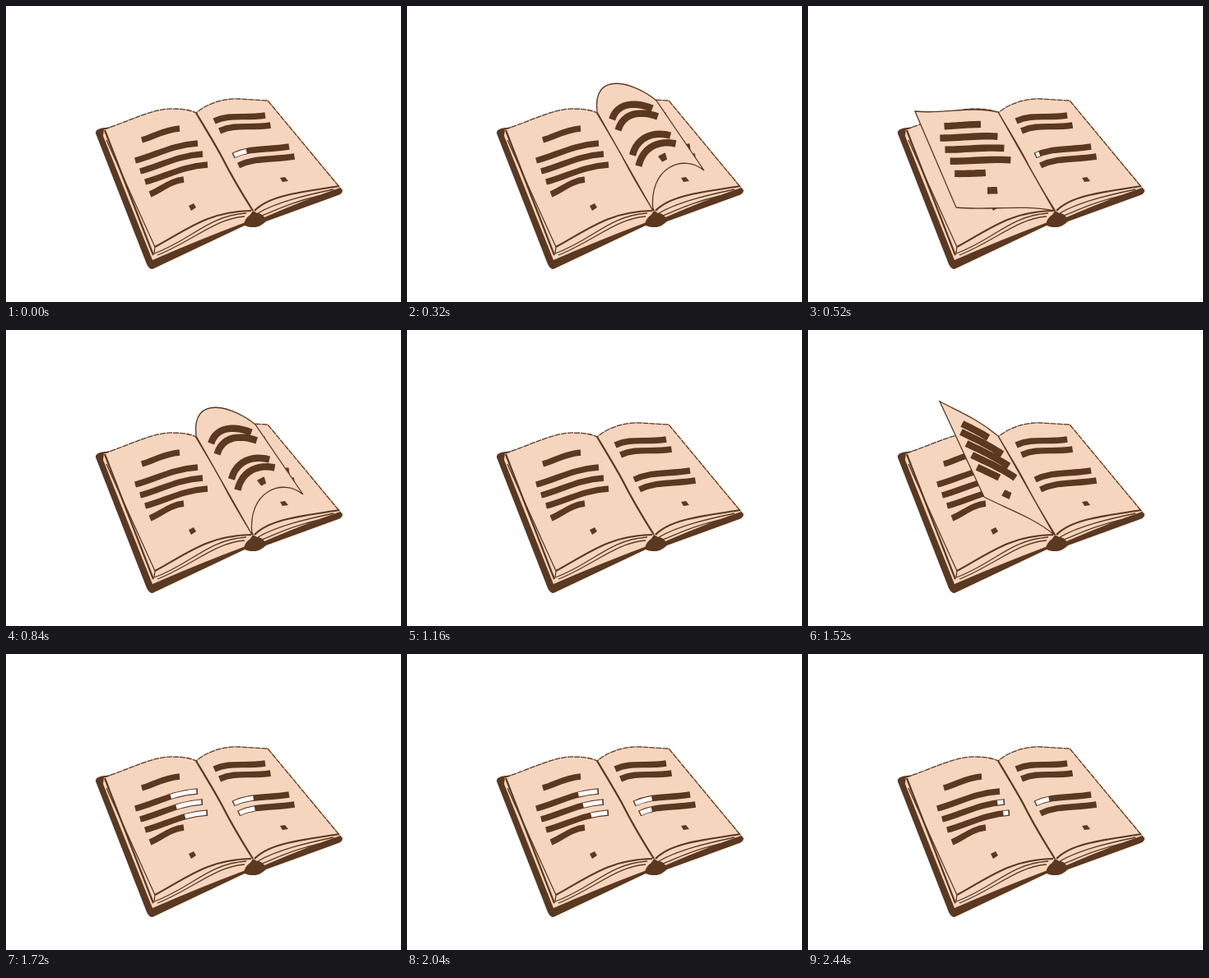
Write an HTML page that moves like this. It is 480 px wide and 360 px high and loops after 2480 ms.

```html
<!DOCTYPE html>
<html lang="en">
<head>
<meta charset="utf-8">
<title>Book</title>
<style>
html, body { margin: 0; width: 100%; height: 100%; overflow: hidden; background: #fff; }
svg { display: block; width: 100vw; height: 100vh; }
.ink { fill: #5b3820; }
.paper { fill: #f6d5bf; }
.line { fill: none; stroke: #5b3820; stroke-width: 1.3; }
.bold { stroke-width: 2.2; }
.bar { fill: none; stroke: #5b3820; stroke-width: 7.4; }
.leaf { stroke-width: 8.4; }
.gap { fill: none; stroke: #fff; stroke-width: 5.4; }
</style>
</head>
<body>
<svg id="stage" viewBox="0 0 480 360">
  <path class="ink" d="M109 155Q108 149 121 148L231 130L318 115L409 224Q409 228 404 230L316 262Q302 273 290 267L178 320Q174 320 171 314Z"/>
  <path class="paper" d="M119 150C150 140 180 124 203 125C215 125 226 127 231 130L300 249L291 263Q235 284 178 309L118 158Z"/>
  <path class="paper" d="M231 130C245 118 265 112 285 113C300 114 312 115 318 115L406 221Q362 236 314 257L300 249Z"/>
  <path class="line" stroke-dasharray="7 1" d="M119 150C150 140 180 124 203 125C215 125 226 127 231 130C245 118 265 112 285 113C300 114 312 115 318 115L405 220"/>
  <path class="line bold" d="M120 151L179 303M181 293C220 272 245 250 298 249M302 249C320 230 360 226 405 219M231 130C243 150 254 168 262 183C272 203 288 230 300 249"/>
  <path class="line" d="M122 163L181 293L180 301C225 285 245 255 292 252M184 303C225 287 255 258 290 256M306 252C330 238 365 230 398 223M311 255C335 245 350 238 380 231"/>
  <path class="ink" d="M289 265C293 249 312 247 316 261C308 271 298 271 289 265Z"/>
  <path class="ink" d="M222 243L228 240L231 245L225 249ZM333 209L339 208L343 213L336 214Z"/>
</svg>
<script>
const LOOP = 2480, STEP = 40, FLIP = 520, FIRST = 80, FLIPS = 3, REST = 1720;
const stage = document.getElementById('stage');

function add(cls, d = '') {
  const el = document.createElementNS('http://www.w3.org/2000/svg', 'path');
  el.setAttribute('class', cls);
  el.setAttribute('d', d);
  stage.append(el);
  return el;
}
const show = (el, on) => { el.style.display = on ? '' : 'none'; };
const mix = (a, b, k) => a + (b - a) * k;
const mixPoint = (a, b, k) => a.map((v, i) => mix(v, b[i], k));
const sum = (a, b) => a.map((v, i) => v + b[i]);

// A printed row that climbs by rise, with an optional hump.
const row = (x, y, w, rise, hump = 0) =>
  `M${x} ${y}c${w * .33} ${rise * .3 - hump} ${w * .58} ${rise * .9 + hump / 2} ${w} ${rise}`;

add('bar', row(165, 163, 46, -14));
const left = [0, 1, 2].map(i => row(157 + 6 * i, 188 + 13 * i, 76, -21));
add('bar', left.join(''));
add('bar', row(175, 229, 41, -18));
const [upper, lower] = [[253, 140, 62, -7], [276, 182, 68, -11]].map(([x, y, w, rise]) =>
  [0, 1].map(i => row(x + 6.5 * i, y + 12 * i, w, rise, 7)));
add('bar', upper.join('') + lower.join(''));

// Unprinted stretches: row, growing from its end or start, percent, life in ms.
const gaps = [
  [left[0], 'end', 40, 700],
  [left[1], 'end', 39, 760],
  [left[2], 'end', 33, 760],
  [lower[0], 'start', 35, 1320],
  [lower[1], 'start', 28, 700]
].map(([d, side, size, life]) => {
  const el = add('gap', d);
  el.setAttribute('pathLength', 100);
  return { el, side, size, life };
});

function drawGaps(age) {
  for (const { el, side, size, life } of gaps) {
    show(el, age < life);
    if (age >= life) continue;
    const len = size * Math.sqrt(1 - age / life);
    el.setAttribute('stroke-dasharray', `0 ${side === 'end' ? 98 - len : 2} ${len} 200`);
  }
}

// Key poses of the leaf: its two outer corners, and how it bends
// where it leaves the spine and where it meets the corners.
const SPINE = { top: [231, 129], foot: [299, 249] };
const poses = [
  { at: 40, top: [318, 115], foot: [402, 220], bendIn: [20, -17], bendOut: [-40, 0] },
  { at: 240, top: [303, 115], foot: [361, 200], bendIn: [-6, -53], bendOut: [-25, -21] },
  { at: 340, top: [205, 25], foot: [265, 140], bendIn: [-8, -40], bendOut: [5, 25] },
  { at: 440, top: [130, 128], foot: [180, 245], bendIn: [-35, -8], bendOut: [35, 4] },
  { at: 520, top: [120, 150], foot: [181, 293], bendIn: [-40, -7], bendOut: [45, -17] }
];

// Print on the leaf: depth, start and end across it.
const front = [.25, .36, .62, .73].map(v => [v, .16, .78]).concat([[.88, .46, .55]]);
const back = [.27, .39, .51].map(v => [v, .18, .84])
  .concat([[.15, .3, .73], [.64, .52, .85], [.82, .49, .59]]);

const leaf = add('paper'), print = add('bar leaf'), edge = add('line');

const cubic = ([a, b, c, d], u) => [0, 1].map(i => {
  const w = 1 - u;
  return w * w * w * a[i] + 3 * w * w * u * b[i] + 3 * w * u * u * c[i] + u * u * u * d[i];
});

function drawLeaf(p) {
  const next = Math.max(1, poses.findIndex(pose => p <= pose.at));
  const a = poses[next - 1], b = poses[next];
  const k = (p - a.at) / (b.at - a.at);
  const get = key => mixPoint(a[key], b[key], k);
  const curve = end => {
    const corner = get(end);
    return [SPINE[end], sum(SPINE[end], get('bendIn')), sum(corner, get('bendOut')), corner];
  };
  const top = curve('top'), foot = curve('foot');

  const outline = `M${top[0]}C${top.slice(1)}L${foot[3]}C${foot.slice(0, 3).reverse()}Z`;
  leaf.setAttribute('d', outline);
  edge.setAttribute('d', outline);
  const strip = ([v, from, to]) => 'M' + Array.from({ length: 13 }, (_, i) => {
    const u = mix(from, to, i / 12);
    return mixPoint(cubic(top, u), cubic(foot, u), v).map(n => n.toFixed(1));
  }).join('L');
  print.setAttribute('d', (p < 320 ? front : back).map(strip).join(''));
}

function draw(time) {
  const t = Math.floor(time % LOOP / STEP) * STEP;
  const p = (t - FIRST + FLIP) % FLIP;
  const turning = t >= FIRST && t < FIRST + FLIPS * FLIP && p > 40;
  [leaf, print, edge].forEach(el => show(el, turning));
  if (turning) drawLeaf(p);
  drawGaps((t - REST + LOOP) % LOOP);
}

const begin = performance.now();
function tick() {
  draw(performance.now() - begin);
  requestAnimationFrame(tick);
}
tick();
</script>
</body>
</html>
```
